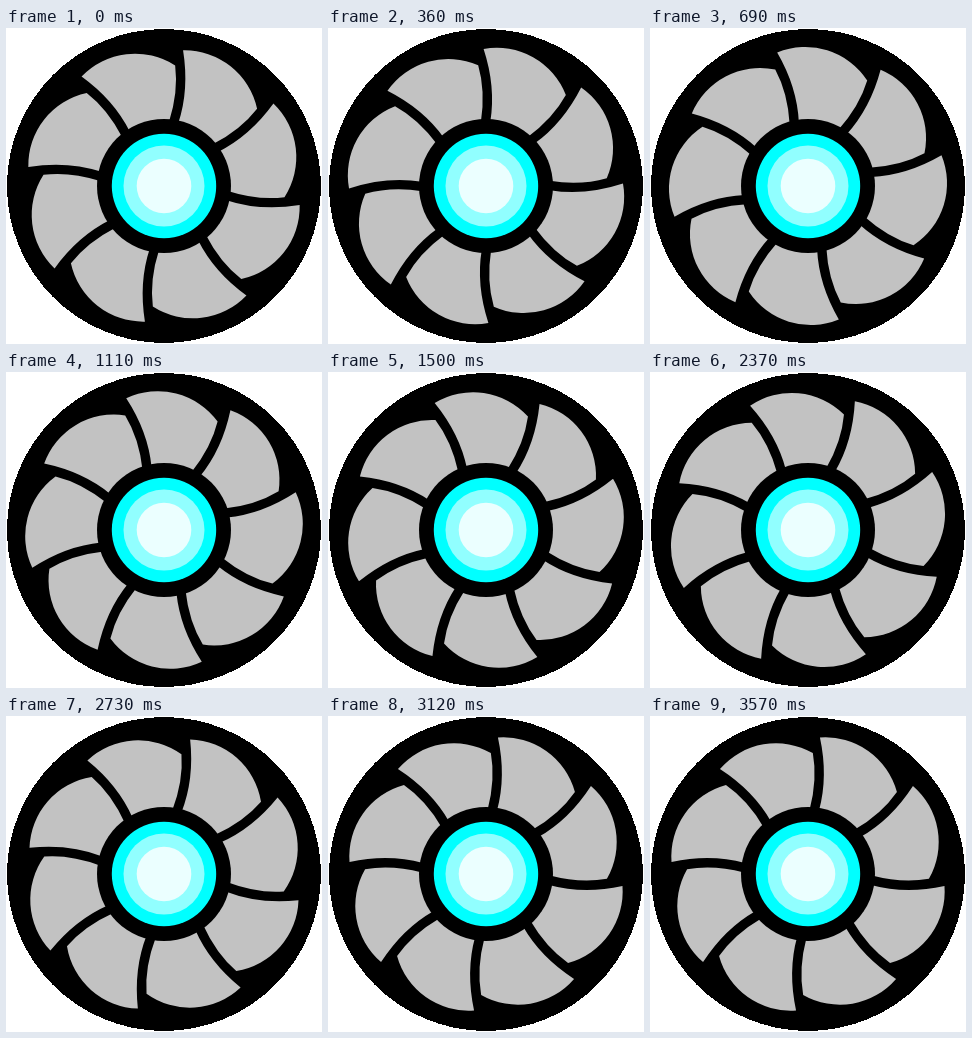
An HTML page for the animation above (3600 ms loop, 316 px wide and 316 px high).

```html
<!DOCTYPE html>
<html lang="en">
<head>
<meta charset="utf-8">
<title>Turbine</title>
<style>
  html, body { margin: 0; width: 100%; height: 100%; overflow: hidden; background: #fff; }
  svg { display: block; width: 100vw; height: 100vh; }
</style>
</head>
<body>
<svg viewBox="0 0 316 316">
  <g transform="translate(158 158)">
    <circle r="157" shape-rendering="crispEdges"/>
    <g id="rotor" fill="#c2c2c2"></g>
    <circle r="67"/>
    <circle r="52.2" fill="#00ffff"/>
    <circle r="40.5" fill="#91ffff"/>
    <circle r="27.3" fill="#ebffff"/>
  </g>
</svg>
<script>
  const BLADES = 8, LOOP = 3600, STEP = 30, START = 8;
  const rotor = document.getElementById('rotor');

  // Polar point: radius and clockwise degrees from the top.
  const at = (r, deg) => {
    const a = deg * Math.PI / 180;
    return (r * Math.sin(a)).toFixed(2) + ' ' + (-r * Math.cos(a)).toFixed(2);
  };

  const blade = [
    'M', at(137, 0),
    'A 74 74 0 0 1', at(121, 42.3),
    'Q', at(95, 45.8), at(64, 41.4),
    'L', at(64, 4.8),
    'Q', at(99.5, 6.8), at(137, 0), 'Z'
  ].join(' ');

  for (let i = 0; i < BLADES; i++) {
    const path = document.createElementNS('http://www.w3.org/2000/svg', 'path');
    path.setAttribute('d', blade);
    path.setAttribute('transform', `rotate(${i * 360 / BLADES})`);
    rotor.appendChild(path);
  }

  function draw(ms) {
    const step = Math.floor((ms % LOOP) / STEP);
    rotor.setAttribute('transform', `rotate(${START + step * 360 * STEP / LOOP})`);
  }

  function tick() {
    draw(performance.now());
    requestAnimationFrame(tick);
  }
  draw(0);
  requestAnimationFrame(tick);
</script>
</body>
</html>
```
